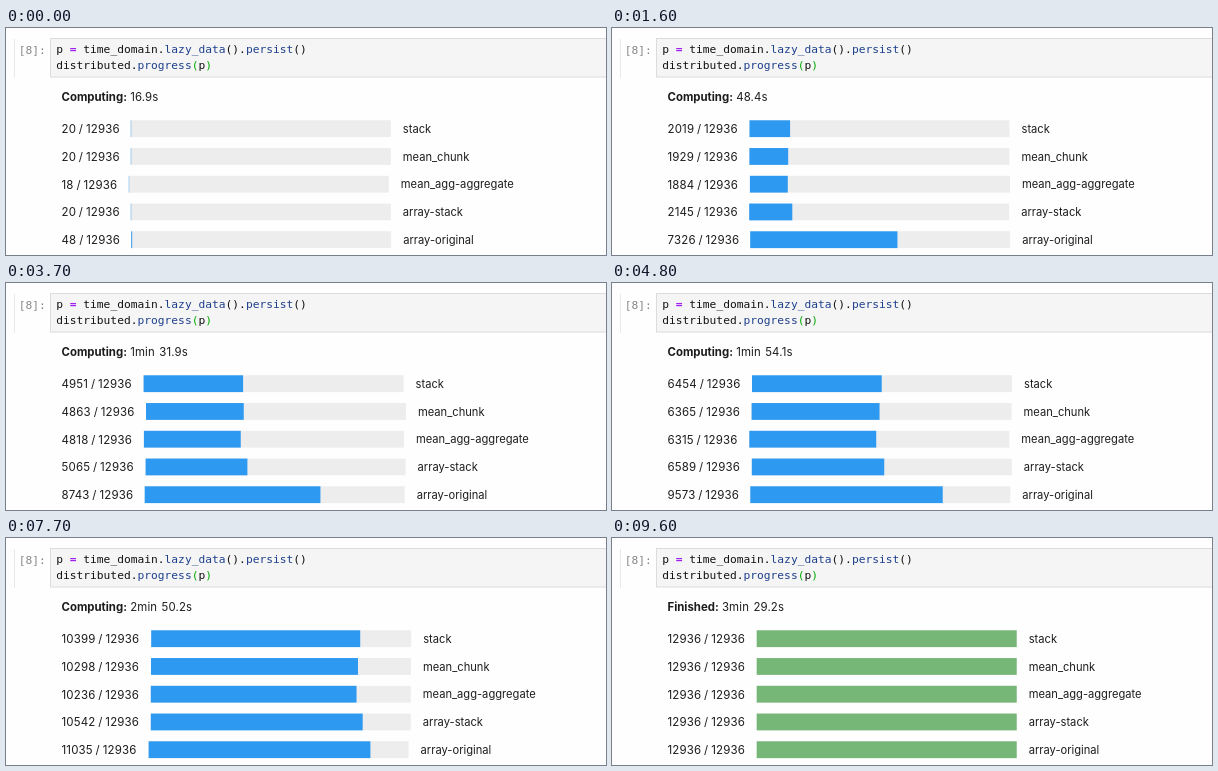
Animation of 600 by 227 pixels, one loop 9.7 s. Source, as an HTML page:

```html
<!DOCTYPE html>
<html lang="en">
<head>
<meta charset="utf-8">
<title>Task progress</title>
<style>
  html, body { margin: 0; width: 100%; height: 100%; overflow: hidden; background: #fefefe; }
  svg { display: block; width: 600px; height: 227px; }
  text { white-space: pre; fill: #1c1c1c; font-family: Inter, sans-serif; }
  .code { font: 11.26px "DejaVu Sans Mono", monospace; fill: #111; }
  .op { fill: #a020f0; font-weight: bold; }
  .prop { fill: #1d3f8c; }
  .match { fill: #00aa00; }
  .prompt { fill: #858585; }
  .status { font-size: 11.4px; }
  .status .state { font-weight: 700; }
  #clock { letter-spacing: 0.15px; word-spacing: 1px; }
  .count { font-size: 11.5px; letter-spacing: 0.15px; word-spacing: -0.6px; }
  .label { font-size: 11.15px; }
  .track { fill: #ededee; }
</style>
</head>
<body>
<svg id="stage" viewBox="0 0 600 227">
  <path d="M8.5 11V50" stroke="#e9e9e9"/>
  <rect x="44.5" y="10.5" width="570" height="38.5" fill="#f5f5f5" stroke="#dcdcdc"/>
  <text class="code prompt" x="12.8" y="26">[8]:</text>
  <text class="code" x="50.2" y="25.2">p <tspan class="op">=</tspan> time_domain.<tspan class="prop">lazy_data</tspan>().<tspan class="prop">persist</tspan>()</text>
  <text class="code" x="50.2" y="41.2">distributed.<tspan class="prop">progress</tspan><tspan class="match">(</tspan>p<tspan class="match">)</tspan></text>
  <text class="status" x="55.5" y="73"><tspan class="state" id="state"></tspan> <tspan id="clock"></tspan></text>
</svg>
<script>
const LOOP = 9700, STEP = 100, TOTAL = 12936, BAR = 260;
const times = [0, 1600, 2600, 4800, 6200, 7700, 9600];
const elapsed = [16.9, 48.4, 69.8, 114.1, 142.1, 170.2, 209.2];
const tasks = [
  { name: "stack", done: [20, 2019, 3447, 6454, 8414, 10399, TOTAL] },
  { name: "mean_chunk", done: [20, 1929, 3361, 6365, 8334, 10298, TOTAL] },
  { name: "mean_agg-aggregate", done: [18, 1884, 3321, 6315, 8296, 10236, TOTAL] },
  { name: "array-stack", done: [20, 2145, 3540, 6589, 8501, 10542, TOTAL] },
  { name: "array-original", done: [48, 7326, 7913, 9573, 10491, 11035, TOTAL], burst: 1.5 }
];
// Advance of each digit 0-9; the bar follows the counter's width
const advance = [7.6, 5.2, 7.1, 7.3, 7.6, 7.2, 7.5, 6.2, 7.5, 7.5];

const stage = document.getElementById("stage");
const state = document.getElementById("state");
const clock = document.getElementById("clock");

function add(tag, attrs, text = "") {
  const el = document.createElementNS("http://www.w3.org/2000/svg", tag);
  for (const key in attrs) el.setAttribute(key, attrs[key]);
  el.textContent = text;
  return stage.appendChild(el);
}

tasks.forEach((task, i) => {
  const mid = 100.7 + i * 27.75;
  const bar = { y: mid - 8.4, height: 16.8 };
  task.count = add("text", { class: "count", x: 55.5, y: mid + 4.3 });
  task.track = add("rect", { class: "track", width: BAR, ...bar });
  task.fill = add("rect", bar);
  task.label = add("text", { class: "label", y: mid + 4.2 }, task.name);
});

function sample(values, t, burst = 1) {
  let i = 0;
  while (i < times.length - 2 && t >= times[i + 1]) i++;
  let u = (t - times[i]) / (times[i + 1] - times[i]);
  if (i === 0) u = 1 - (1 - u) ** burst;
  return values[i] + (values[i + 1] - values[i]) * u;
}

function duration(seconds) {
  const tenths = Math.round(seconds * 10);
  const minutes = Math.floor(tenths / 600);
  const rest = ((tenths % 600) / 10).toFixed(1) + "s";
  return minutes ? `${minutes}min ${rest}` : rest;
}

function draw(t) {
  state.textContent = t >= times[times.length - 1] ? "Finished:" : "Computing:";
  clock.textContent = duration(sample(elapsed, t));
  for (const task of tasks) {
    const done = Math.round(sample(task.done, t, task.burst));
    const x = [...String(done)].reduce((sum, d) => sum + advance[d], 110.1);
    task.count.textContent = `${done} / ${TOTAL}`;
    task.track.setAttribute("x", x);
    task.fill.setAttribute("x", x);
    task.fill.setAttribute("width", BAR * done / TOTAL);
    task.fill.setAttribute("fill", done === TOTAL ? "#76b778" : "#2d99f0");
    task.label.setAttribute("x", x + 272);
  }
}

const start = performance.now();
function tick() {
  const t = (performance.now() - start) % LOOP;
  draw(Math.floor(t / STEP) * STEP);
  requestAnimationFrame(tick);
}
tick();
</script>
</body>
</html>
```
